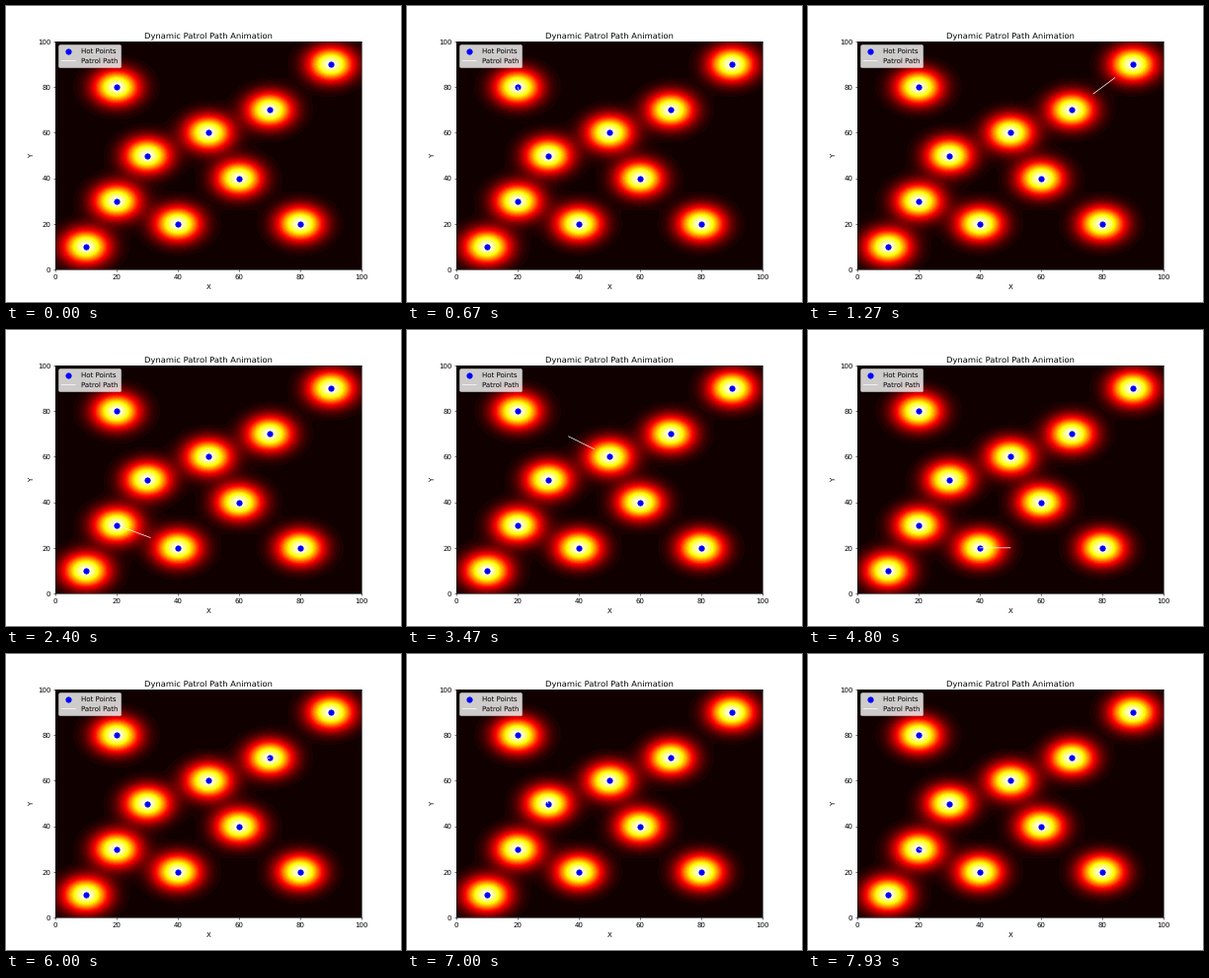
Write a matplotlib script that moves like this. It is 400 px wide and 300 px high and loops after 8 s.

```python
import numpy as np
import matplotlib.pyplot as plt
from matplotlib.animation import FuncAnimation

FRAMES = 120
LOOP_MS = 8000
SPEED = 10.0  # units travelled per frame
SIGMA = 5.0

POINTS = {
    "a": (10, 10), "b": (20, 30), "c": (20, 80), "d": (30, 50), "e": (40, 20),
    "f": (50, 60), "g": (60, 40), "h": (70, 70), "i": (80, 20), "j": (90, 90),
}
# Three patrol laps, each visiting every hot point once
ROUTE = "adcfhjigeb" + "adcfhjgieb" + "agfhjcdieb" + "a"

plt.rcParams["text.hinting"] = "none"


def heat_map(points, size=101):
    x, y = np.meshgrid(np.linspace(0, 100, size), np.linspace(0, 100, size))
    heat = np.zeros_like(x)
    for px, py in points:
        heat += np.exp(-((x - px) ** 2 + (y - py) ** 2) / (2 * SIGMA ** 2))
    return x, y, heat


def patrol_steps(route):
    """Positions along the route, SPEED apart, snapping to every hot point."""
    stops = [np.array(POINTS[name], float) for name in route]
    steps = [stops[0]] * 3  # a short wait before setting off
    for start, end in zip(stops, stops[1:]):
        dist = np.hypot(*(end - start))
        for d in np.arange(SPEED, dist - 1e-6, SPEED):
            steps.append(start + (end - start) * d / dist)
        steps.append(end)
    return np.array(steps)


hot = np.array(list(POINTS.values()))
steps = patrol_steps(ROUTE)

fig, ax = plt.subplots(figsize=(8, 6), dpi=50)
ax.contourf(*heat_map(hot), levels=50, cmap="hot")
ax.scatter(hot[:, 0], hot[:, 1], c="blue", s=60, label="Hot Points", snap=False)
path, = ax.plot([], [], color="white", lw=1, label="Patrol Path", snap=False)
ax.set_xlim(0, 100)
ax.set_ylim(0, 100)
ax.set_title("Dynamic Patrol Path Animation")
ax.set_xlabel("X")
ax.set_ylabel("Y")
legend = ax.legend(loc="upper left")
for handle in legend.legend_handles:
    handle.set_snap(False)


def update(frame):
    piece = steps[frame:frame + 2]
    if np.allclose(piece[0], piece[1]):
        path.set_data([], [])
    else:
        path.set_data(piece[:, 0], piece[:, 1])
    return path,


anim = FuncAnimation(fig, update, frames=FRAMES, interval=LOOP_MS / FRAMES,
                     repeat=True, repeat_delay=0)
plt.show()
```
